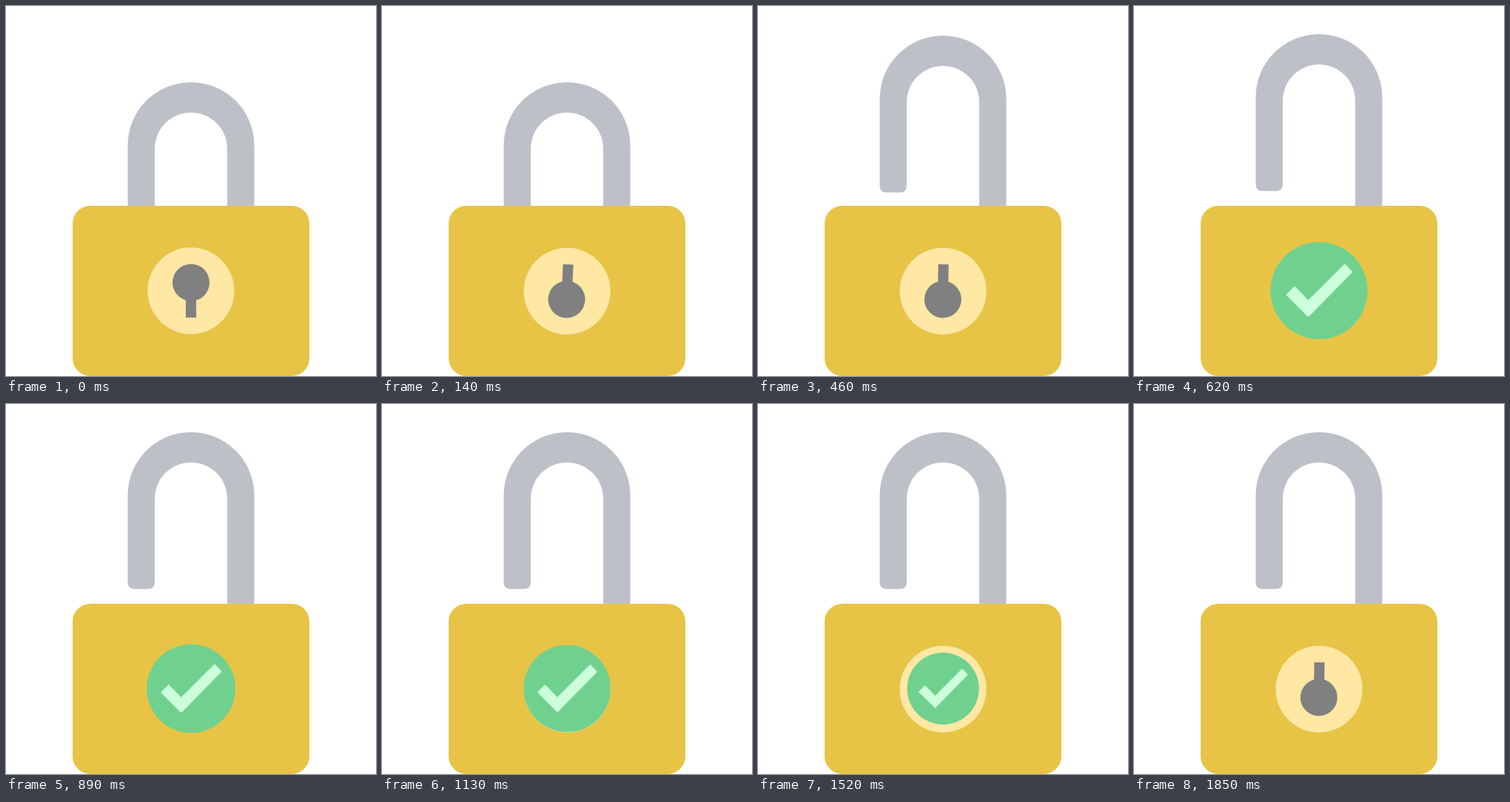
Write an HTML page that moves like this. It is 500 by 500 pixels and loops after 2120 ms.

```html
<!DOCTYPE html>
<html lang="en">
<head>
<meta charset="utf-8">
<title>Padlock</title>
<style>
  html, body { margin: 0; width: 100%; height: 100%; overflow: hidden; background: #fff; }
  svg { display: block; width: 100vw; height: 100vh; }
</style>
</head>
<body>
<svg viewBox="0 0 500 500">
  <path id="shackle" fill="#bdc1c7" d="M164.5 188.5A85.5 85.5 0 0 1 335.5 188.5V400H299V193A49 49 0 0 0 201 193V305.5Q201 315 191.5 315H174Q164.5 315 164.5 305.5Z"/>
  <rect x="90" y="270" width="320" height="230" rx="24" fill="#e7c446"/>
  <g id="key">
    <circle cx="249.9" cy="384.9" r="58.6" fill="#ffe7a4"/>
    <g fill="#808080">
      <circle cx="250" cy="373.7" r="25"/>
      <rect x="243" y="390" width="14" height="31"/>
    </g>
  </g>
  <g id="badge">
    <circle r="58.5" fill="#70d18f"/>
    <path fill="#ccffdb" stroke="#ccffdb" stroke-width="2" stroke-linejoin="round"
      d="M-38.6 5L-29.5-4.1L-13 12.9L31-31.1L39.1-22.5L-13 30.6Z"/>
  </g>
</svg>
<script>
const LOOP = 2120;
const [shackle, key, badge] = ['shackle', 'key', 'badge'].map(id => document.getElementById(id));

// Eased value through [time, value] stops
function track(t, stops) {
  if (t <= stops[0][0]) return stops[0][1];
  for (let i = 1; i < stops.length; i++) {
    const [t0, v0] = stops[i - 1], [t1, v1] = stops[i];
    if (t < t1) return v0 + (v1 - v0) * (1 - Math.cos(Math.PI * (t - t0) / (t1 - t0))) / 2;
  }
  return stops[stops.length - 1][1];
}

function badgeScale(t) {
  if (t < 600) return track(t, [[470, 0], [600, 1.137]]);
  if (t < 1370) return 1 + 0.137 * Math.exp((600 - t) / 170);
  return track(t, [[1370, 1], [1470, 1.077], [1640, -0.12], [1850, 0]]);
}

function draw(now) {
  const t = now % LOOP;
  const rise = track(t, [[160, 0], [320, 74], [460, 63], [540, 65]]);
  const turn = track(t, [[0, 0], [160, 189], [320, 181]]);
  shackle.setAttribute('transform', `translate(0 ${-rise})`);
  key.setAttribute('transform', `rotate(${turn} 250 385.1)`);
  badge.setAttribute('transform', `translate(250.1 384.6) scale(${badgeScale(t)})`);
}

const start = performance.now();
function tick() {
  draw(performance.now() - start);
  requestAnimationFrame(tick);
}
tick();
</script>
</body>
</html>
```
